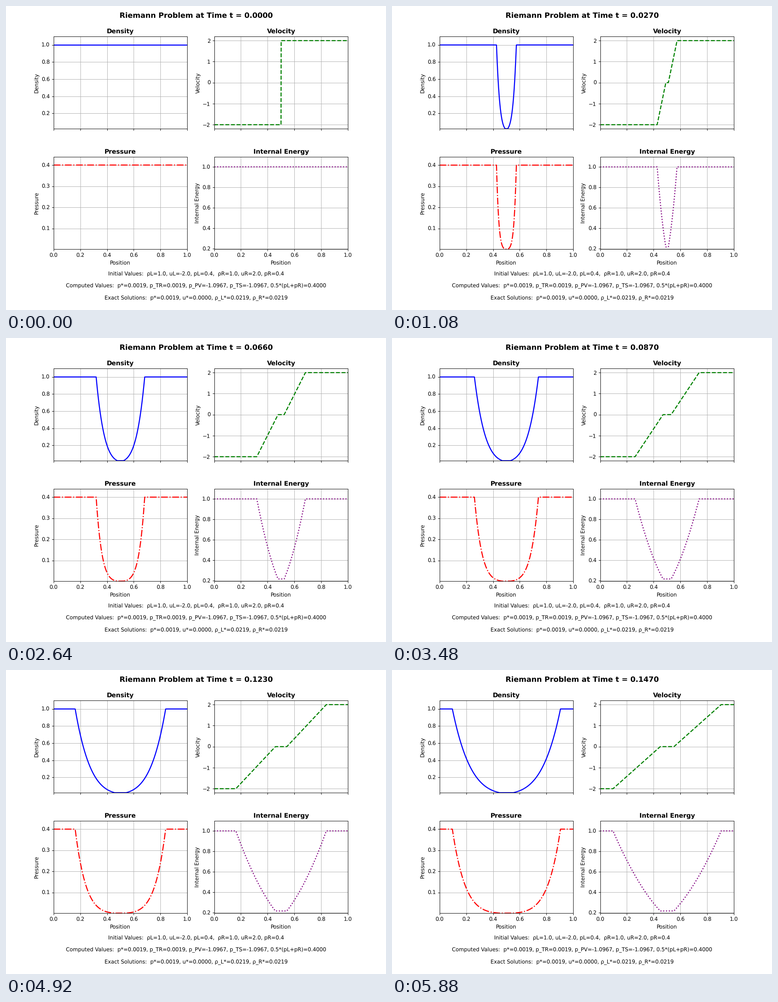
A matplotlib script that plays this animation: 837 by 669 pixels, repeating every 6 s.

```python
import numpy as np
import matplotlib.pyplot as plt
from matplotlib.animation import FuncAnimation

WIDTH, HEIGHT, DPI = 837, 669, 83.7
FRAMES, INTERVAL, TIME_STEP = 50, 120, 0.003

GAMMA = 1.4
RHO, SPEED, P = 1.0, 2.0, 0.4  # gas pulled apart symmetrically
SOUND = np.sqrt(GAMMA * P / RHO)
SOUND_STAR = SOUND - (GAMMA - 1) / 2 * SPEED

plt.rcParams["text.hinting"] = "none"
x = np.linspace(0, 1, 1000)


def state(sound):
    """Density, pressure and internal energy along an isentrope."""
    ratio = sound / SOUND
    rho = RHO * ratio ** (2 / (GAMMA - 1))
    p = P * ratio ** (2 * GAMMA / (GAMMA - 1))
    return rho, p, p / ((GAMMA - 1) * rho)


def solve(t):
    """Two rarefaction fans around a resting star region."""
    offset = x - 0.5
    xi = np.abs(offset) / t if t > 0 else np.full_like(x, np.inf)
    fan = 2 / (GAMMA + 1) * (SOUND + (GAMMA - 1) / 2 * (xi - SPEED))
    sound = np.clip(fan, SOUND_STAR, SOUND)
    velocity = np.sign(offset) * (SPEED - 2 / (GAMMA - 1) * (SOUND - sound))
    rho, p, energy = state(sound)
    return rho, velocity, p, energy


rho_star, p_star, e_star = state(SOUND_STAR)
p_linear = P - SPEED * RHO * SOUND

fig, axes = plt.subplots(2, 2, sharex=True, dpi=DPI,
                         figsize=(WIDTH / DPI, HEIGHT / DPI))
fig.subplots_adjust(left=0.125, right=0.9, bottom=0.2, top=0.9,
                    wspace=0.2006, hspace=0.3003)
heading = fig.suptitle("", fontsize=14, fontweight="bold")

panels = [
    ("Density", "blue", "-", 0.9 * rho_star, 1.1 * RHO),
    ("Velocity", "green", "--", -1.1 * SPEED, 1.1 * SPEED),
    ("Pressure", "red", "-.", 0.9 * p_star, 1.1 * P),
    ("Internal Energy", "purple", ":", 0.9 * e_star, 1.1),
]
lines = []
for ax, (name, color, style, low, high) in zip(axes.flat, panels):
    line, = ax.plot([], [], color=color, linestyle=style, linewidth=2)
    lines.append(line)
    ax.set_title(name, fontweight="bold")
    ax.set_ylabel(name)
    ax.set_xlim(0, 1)
    ax.set_ylim(low, high)
    ax.grid(True)
for ax in axes[1]:
    ax.set_xlabel("Position")

notes = [
    f"Initial Values:  ρL={RHO}, uL={-SPEED}, pL={P},  "
    f"ρR={RHO}, uR={SPEED}, pR={P}",
    f"Computed Values:  p*={p_star:.4f}, p_TR={p_star:.4f}, "
    f"p_PV={p_linear:.4f}, p_TS={p_linear:.4f}, 0.5*(pL+pR)={P:.4f}",
    f"Exact Solutions:  p*={p_star:.4f}, u*={0:.4f}, "
    f"ρ_L*={rho_star:.4f}, ρ_R*={rho_star:.4f}",
]
for y, note in zip((0.12, 0.08, 0.04), notes):
    fig.text(0.5, y, note, ha="center", va="center", fontsize=10)


def update(frame):
    t = frame * TIME_STEP
    heading.set_text(f"Riemann Problem at Time t = {t:.4f}")
    for line, values in zip(lines, solve(t)):
        line.set_data(x, values)
    return [heading, *lines]


animation = FuncAnimation(fig, update, frames=FRAMES, interval=INTERVAL,
                          repeat=True, repeat_delay=0, blit=False)
plt.show()
```
